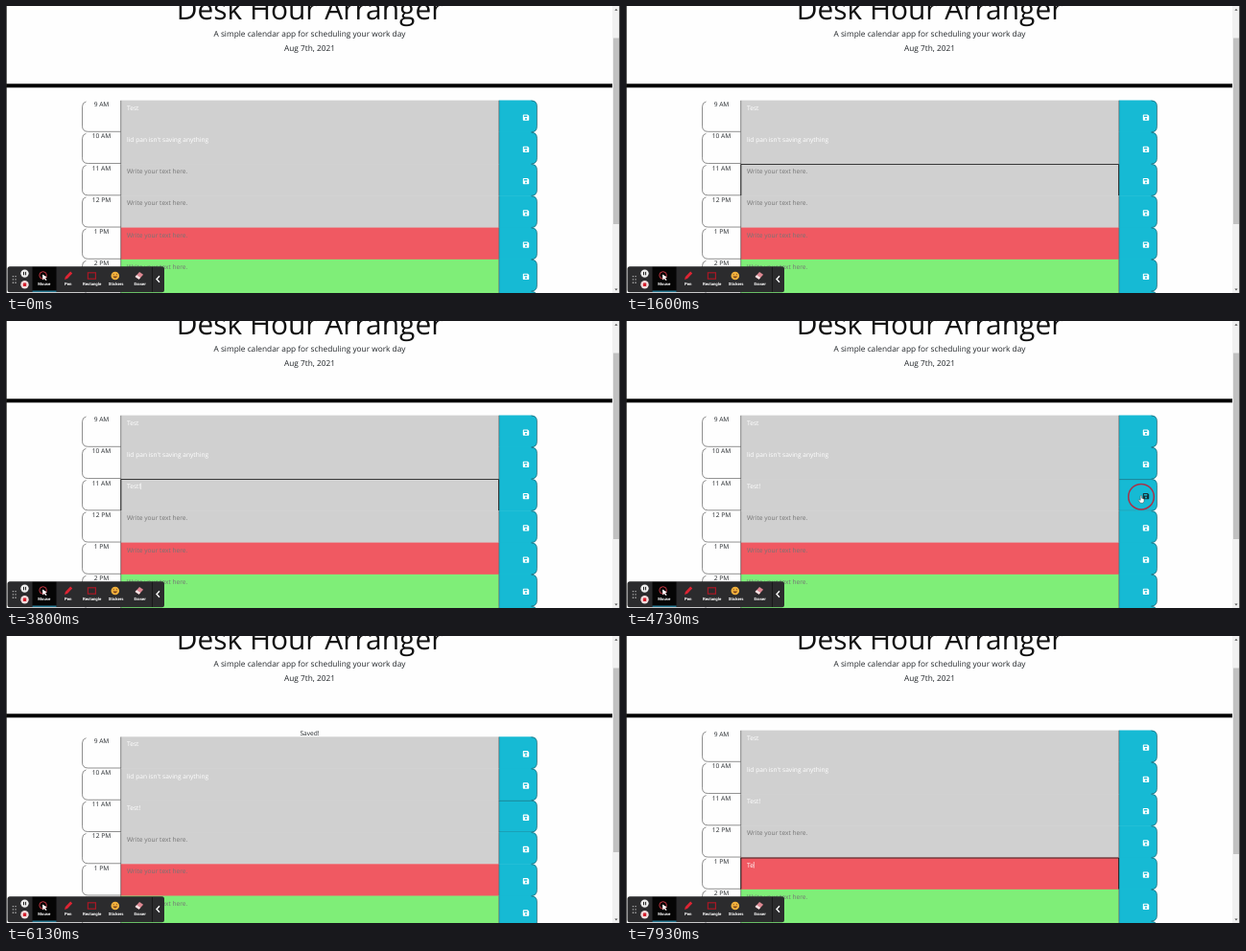
An HTML page for the animation above (8 s loop, 640 by 300 pixels).

```html
<!DOCTYPE html>
<html lang="en">
<head>
<meta charset="utf-8">
<title>Day planner</title>
<style>
  html, body { margin: 0; width: 100%; height: 100%; overflow: hidden; background: #fff; }
  svg { display: block; width: 640px; height: 300px; }
  text { font: 6.64px "Open Sans", "Noto Sans", sans-serif; fill: #212529; text-rendering: geometricPrecision; }
  .mid { text-anchor: middle; }
  .title { font-size: 29.9px; fill: #111; }
  .lead { font-size: 8.3px; }
  .tool { font: 700 4.3px Roboto, Inter, sans-serif; fill: #fff; text-anchor: middle; }
</style>
</head>
<body>
<svg viewBox="0 0 640 300">
  <rect width="640" height="300" fill="#fefefe"/>
  <text class="mid title" x="316.5" y="14.2">Desk Hour Arranger</text>
  <text class="mid lead" x="316.5" y="31.7">A simple calendar app for scheduling your work day</text>
  <text class="mid lead" x="316.5" y="46.8">Aug 7th, 2021</text>
  <rect y="81.3" width="632" height="4"/>
  <text class="mid" id="saved" x="316.5" y="104.2">Saved!</text>
  <g id="rows"></g>

  <g id="pointer">
    <circle r="13.3" cy="-2.3" fill="none" stroke="#a8324a" stroke-width="1.5" id="ring"/>
    <path id="hand" d="M-.8-3.2q.8-.9 1.5 0v2.4l2.3.7v2.5l-.9 1.8h-3l-2-3 .7-.7 1.4 1z" fill="#fff" stroke="#222" stroke-width=".4"/>
    <path id="arrow" d="M0-3v6.6l1.6-1.5 1 2.3 1-.5-1-2.2h2z" fill="#fff" stroke="#222" stroke-width=".5"/>
  </g>

  <g id="scrollbar">
    <rect x="632" width="8" height="300" fill="#f1f1f1"/>
    <rect id="thumb" x="633" y="33.5" width="6" height="194.5" fill="#c1c1c1"/>
    <path d="M634.4 4.8l1.6-2 1.6 2zM634.4 295.5l1.6 2 1.6-2z" fill="#555"/>
  </g>
  <path d="M.4 0v300M639.6 0v300" stroke="#222" stroke-width=".8"/>

  <g id="toolbar">
    <rect x="1.5" y="272.3" width="163.5" height="27" rx="2.5" fill="#2b2b2d"/>
    <rect x="27.5" y="272.8" width="25" height="26" fill="#050505"/>
    <rect x="27.5" y="297.6" width="25" height="1.2" fill="#2b8fae"/>
    <path d="M7.4 282v8M10 282v8" stroke="#aaa" stroke-width="1.3" stroke-dasharray="1.3 2"/>
    <circle cx="19.5" cy="279.6" r="4.2" fill="#eee"/>
    <path d="M18.5 277.9v3.4M20.5 277.9v3.4" stroke="#222"/>
    <circle cx="19.5" cy="291.2" r="4.2" fill="#f1dddd"/>
    <rect x="17.8" y="289.5" width="3.4" height="3.4" rx=".5" fill="#d5202d"/>
    <circle cx="38.6" cy="281.5" r="3.8" fill="none" stroke="#c83642"/>
    <path d="M38 280.5l.3 6 1.5-1.5 1.8 2 1-.8-1.8-2 2-.6z" fill="#fff"/>
    <path d="M67.2 277.6l2 2-5.2 5.4-3 .9.9-3z" fill="#dd2433"/>
    <rect x="85.4" y="278.8" width="8" height="6.4" fill="none" stroke="#a81825" stroke-width="1.2"/>
    <circle cx="113.8" cy="282" r="4.3" fill="#f2b13c"/>
    <path d="M111.4 282.5q2.4 4 4.8 0z" fill="#7c431d"/>
    <path d="M112.2 280v1.2M115.3 280v1.2" stroke="#7c431d" stroke-width=".8"/>
    <path d="M134.6 283l4.5-5 4 2.7-4.5 5z" fill="#dc8792"/>
    <path d="M134.6 283l1.6-1.8 4 2.7-1.6 1.8z" fill="#f5e6e6"/>
    <text class="tool" x="39.8" y="292.2">Mouse</text>
    <text class="tool" x="64.8" y="292.2">Pen</text>
    <text class="tool" x="89.6" y="292.2">Rectangle</text>
    <text class="tool" x="114.6" y="292.2">Stickers</text>
    <text class="tool" x="139.6" y="292.2">Eraser</text>
    <path d="M152.5 273v26" stroke="#151515" stroke-width=".8"/>
    <path d="M160 282.3l-3 3.2 3 3.2" fill="none" stroke="#fff" stroke-width="1.3"/>
  </g>
</svg>
<script>
const LOOP = 8000, TOP = 98.8, PITCH = 33.25;
const GREY = '#d0d0d0', RED = '#f05962', GREEN = '#7fee78';
const PLACEHOLDER = 'Write your text here.';
const CLICK = 4640, SAVED_ON = 4870, SAVED_OFF = 6500;

// keys: times at which each further character of text appears
const rows = [
  { hour: '9 AM', color: GREY, text: 'Test' },
  { hour: '10 AM', color: GREY, text: "lid pan isn't saving anything" },
  { hour: '11 AM', color: GREY, text: 'Test!', keys: [1900, 2050, 2200, 2350, 2750], focus: [1070, CLICK] },
  { hour: '12 PM', color: GREY, text: '', keys: [] },
  { hour: '1 PM', color: RED, text: 'Te', keys: [7720, 7860], focus: [7130, LOOP] },
  { hour: '2 PM', color: GREEN, text: '', keys: [] },
  { hour: '3 PM', color: GREEN, text: '', keys: [] },
];

const $ = id => document.getElementById(id);
const show = (el, on) => el.setAttribute('visibility', on ? 'visible' : 'hidden');
const within = (t, [from, to]) => t >= from && t < to;

$('rows').innerHTML = rows.map(({ hour, color }, i) => `
  <g class="row" transform="translate(0 ${TOP + i * PITCH})">
    <path d="M83.5 1.2q-4 .8-4 5.3V26.5q0 6 6 6H120" fill="none" stroke="#444" stroke-width=".6"/>
    <text class="mid" x="99.5" y="6.2">${hour}</text>
    <path d="M513.8 -.2H547.5q6 .2 6 6V27.2q0 6-6 6.2H513.8z" fill="#16bad4"/>
    <path d="M547.5 .2q6 .2 6 6V26.8q0 6-6 6.2" fill="none" stroke="#24515c" stroke-width=".6"/>
    <path class="icon" fill-rule="evenodd" fill="#fff" d="M538.8 15.3q0-.7.7-.7h4.3l1.4 1.4v4.2q0 .7-.7.7h-5q-.7 0-.7-.7zM539.9 15.7v1.5h3.4v-1.5zM543 19.1a1 1 0 1 0-2 0a1 1 0 1 0 2 0z"/>
    <rect x="119.7" y="-.2" width="394" height="${PITCH + .4}" fill="${color}"/>
    <path d="M119.7 0V${PITCH}M513.8 0V${PITCH}" stroke="#444" stroke-width=".6"/>
    <text class="entry" x="126" y="9.8"></text>
    <path class="caret" d="M0 4.2v6.6" stroke="#fff" stroke-width=".6"/>
    <path class="outline" d="M119.8 ${PITCH - .4}V.2H513.6V${PITCH - .4}" fill="none" stroke="#111" stroke-width=".8"/>
    <path class="pressed" d="M513.8 .3H547.5M513.8 33H547.5" stroke="#24515c" stroke-width=".5"/>
  </g>`).join('');

document.querySelectorAll('.row').forEach((el, i) => {
  for (const part of ['icon', 'entry', 'caret', 'outline', 'pressed'])
    rows[i][part] = el.querySelector('.' + part);
});

function drawRow(row, t) {
  const typed = row.keys ? row.keys.filter(k => k <= t) : null;
  const value = typed ? row.text.slice(0, typed.length) : row.text;
  const label = value || PLACEHOLDER;
  if (row.entry.textContent !== label) row.entry.textContent = label;
  row.entry.style.fill = value ? '#fff' : '#757575';

  const focused = !!row.focus && within(t, row.focus);
  show(row.outline, focused);
  const blinkStart = focused ? Math.max(row.focus[0], ...typed) : 0;
  show(row.caret, focused && (t - blinkStart) % 1000 < 500);
  if (focused) {
    const width = value ? row.entry.getComputedTextLength() : 0;
    row.caret.setAttribute('transform', `translate(${126.4 + width} 0)`);
  }
  show(row.pressed, row === rows[2] && within(t, [CLICK, 7130]));
}

function drawPointer(t) {
  const p = Math.min(1, Math.max(0, (t - 4250) / 300));
  const ease = p * p * (3 - 2 * p);
  const x = 470 + 67 * ease, y = 172 + 14 * ease;
  const visible = within(t, [4250, 5100]), overButton = x > 514;
  $('pointer').setAttribute('transform', `translate(${x} ${y})`);
  show($('arrow'), visible && !overButton);
  show($('hand'), visible && overButton);
  show($('ring'), within(t, [CLICK, 4930]));
  rows[2].icon.setAttribute('fill', visible && overButton ? '#173238' : '#fff');
}

function frame(now) {
  const t = now % LOOP;
  const saved = within(t, [SAVED_ON, SAVED_OFF]);
  rows.forEach(row => drawRow(row, t));
  drawPointer(t);
  show($('saved'), saved);
  $('rows').setAttribute('transform', `translate(0 ${saved ? 6.7 : 0})`);
  $('thumb').setAttribute('height', saved ? 192.5 : 194.5);
  requestAnimationFrame(frame);
}
requestAnimationFrame(frame);
</script>
</body>
</html>
```
